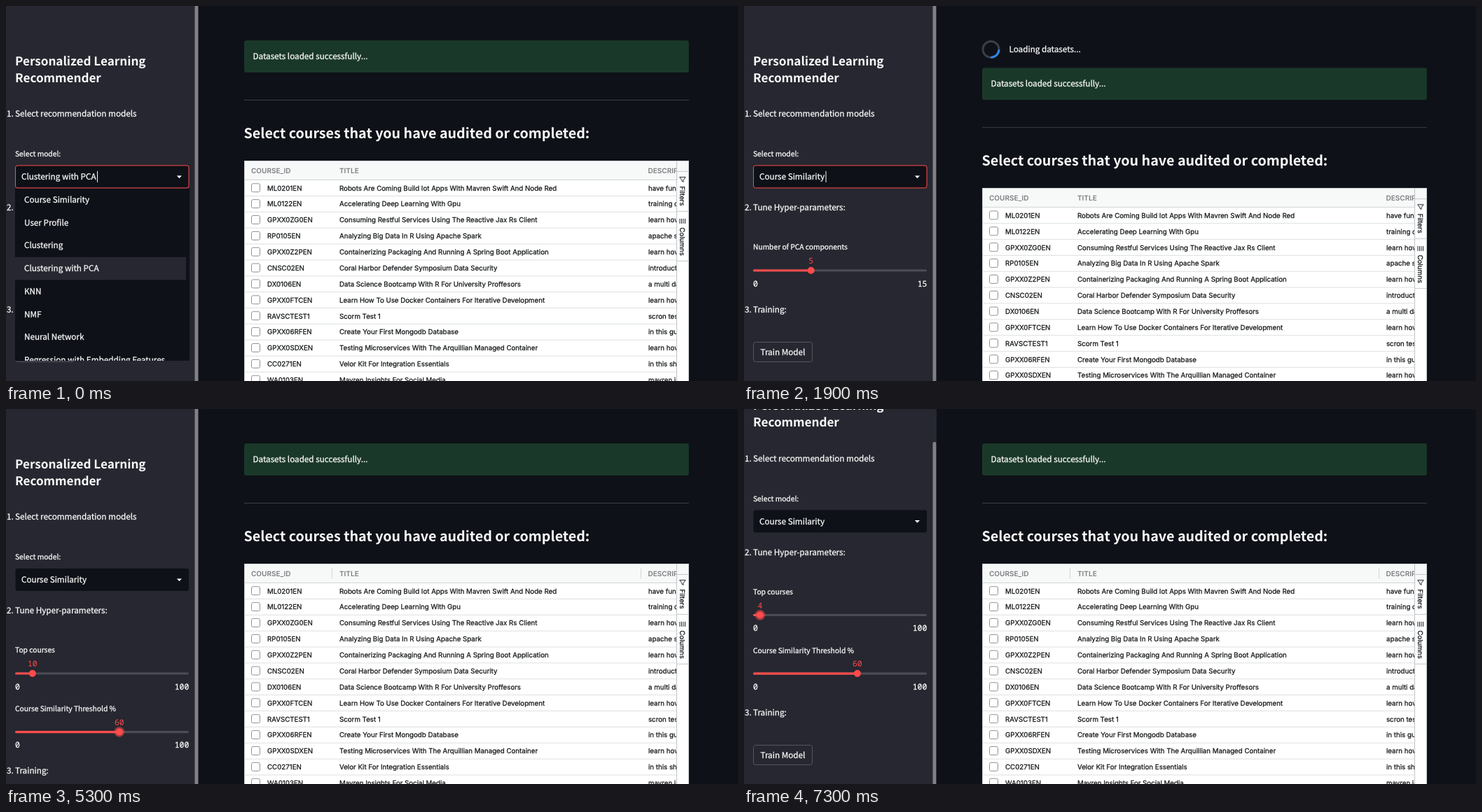
Recreate the animation shown at these times as an HTML page. Size 1045 by 536 pixels, loop 8 s.

```html
<!DOCTYPE html>
<html lang="en">
<head>
<meta charset="utf-8">
<title>Learning recommender</title>
<style>
  html, body { margin: 0; width: 100%; height: 100%; overflow: hidden; background: #0e1117; }
  svg { display: block; width: 100%; height: 100%; }
  text {
    font: 11.7px "Noto Sans CJK JP", "Noto Sans CJK SC", "Noto Sans", sans-serif;
    fill: #fafafa; stroke: #fafafa; stroke-width: .28px; text-rendering: geometricPrecision;
  }
  .title, .head { font-weight: 700; stroke: none; }
  .title { font-size: 17.1px; }
  .head { font-size: 19.7px; }
  .label { font-size: 10.25px; }
  .num { font: 11.4px "Noto Sans Mono", "Liberation Mono", monospace; }
  .red { fill: #ff4b4b; stroke: none; }
  .cell { font: 9.71px Inter, "Liberation Sans", sans-serif; fill: #121517; stroke: #121517; stroke-width: .25px; }
  .col { font: 600 10px Inter, "Liberation Sans", sans-serif; fill: #7b7d80; stroke: none; }
</style>
</head>
<body>
<svg id="stage" viewBox="0 0 1045 536" preserveAspectRatio="none"></svg>
<script>
const LOOP = 8000, SCROLL = 83.5, SPIN_SHIFT = 39.2;
const stage = document.getElementById('stage');

function el(parent, tag, attrs = {}, content) {
  const e = document.createElementNS('http://www.w3.org/2000/svg', tag);
  set(e, attrs);
  if (content !== undefined) e.textContent = content;
  parent.appendChild(e);
  return e;
}
function set(e, attrs) {
  for (const k in attrs) e.setAttribute(k, attrs[k]);
}
const group = (p, attrs) => el(p, 'g', attrs);
const text = (p, x, y, s, cls = '', attrs = {}) => el(p, 'text', { x, y, class: cls, ...attrs }, s);
const rect = (p, x, y, width, height, fill, attrs = {}) => el(p, 'rect', { x, y, width, height, fill, ...attrs });
const show = (e, on) => set(e, { visibility: on ? 'visible' : 'hidden' });
const move = (e, y) => set(e, { transform: `translate(0 ${y})` });
const clamp = v => Math.max(0, Math.min(1, v));

// Value of the last key at or before t
function step(t, keys) {
  let v = keys[0][1];
  for (const [at, val] of keys) if (t >= at) v = val;
  return v;
}

function clip(id, x, y, w, h) {
  rect(el(defs, 'clipPath', { id }), x, y, w, h, '#000');
  return { 'clip-path': `url(#${id})` };
}

const defs = el(stage, 'defs');
rect(stage, 0, 0, 1045, 536, '#0e1117');

// Main panel
const spinner = group(stage);
el(spinner, 'circle', { cx: 352.5, cy: 62, r: 11.5, fill: 'none', stroke: '#3b3e45', 'stroke-width': 3 });
const arc = el(spinner, 'path', {
  d: 'M344.4 53.9A11.5 11.5 0 0 1 360.6 53.9', fill: 'none', stroke: '#2f86e0', 'stroke-width': 3
});
text(spinner, 378.5, 66.2, 'Loading datasets...');

const main = group(stage);
rect(main, 340, 49.3, 634.8, 45.7, '#1a3829', { rx: 3 });
text(main, 352.5, 76.2, 'Datasets loaded successfully...');
rect(main, 340, 134, 634.8, 1, '#3c3e42');
text(main, 339.5, 189, 'Select courses that you have audited or completed:', 'head');

rect(main, 340, 221, 634.8, 360, '#fff');
rect(main, 340, 221, 634.8, 27.5, '#f7f8f8');
rect(main, 340, 248, 617, 1, '#cfd3d6');
const table = group(main, clip('table', 340, 221, 617, 340));
text(table, 350, 238.8, 'COURSE_ID', 'col');
text(table, 476, 238.8, 'TITLE', 'col');
text(table, 916.5, 238.8, 'DESCRIPTION', 'col');
const seps = group(table);
for (const x of [465, 906]) rect(seps, x, 228, 1, 14, '#d0d3d5');

const rows = `ML0201EN|Robots Are Coming Build Iot Apps With Mavren Swift And Node Red|have fun with
ML0122EN|Accelerating Deep Learning With Gpu|training com
GPXX0ZG0EN|Consuming Restful Services Using The Reactive Jax Rs Client|learn how to
RP0105EN|Analyzing Big Data In R Using Apache Spark|apache spark
GPXX0Z2PEN|Containerizing Packaging And Running A Spring Boot Application|learn how to
CNSC02EN|Coral Harbor Defender Symposium Data Security|introduction
DX0106EN|Data Science Bootcamp With R For University Proffesors|a multi day
GPXX0FTCEN|Learn How To Use Docker Containers For Iterative Development|learn how to
RAVSCTEST1|Scorm Test 1|scron test
GPXX06RFEN|Create Your First Mongodb Database|in this guided
GPXX0SDXEN|Testing Microservices With The Arquillian Managed Container|learn how to
CC0271EN|Velor Kit For Integration Essentials|in this short
WA0103EN|Mavren Insights For Social Media|mavren insights`.split('\n');
rows.forEach((row, i) => {
  const y = 260 + i * 22.87;
  row.split('|').forEach((s, k) => text(table, [373, 476, 917][k], y + 3.6, s, 'cell'));
  rect(table, 350.5, y - 6.2, 12, 12, '#fff', { rx: 2.2, stroke: '#8f9294' });
  rect(table, 340, y + 11, 617, 1, '#dde0e2');
});

// Table tool tabs
rect(main, 957, 221, 1, 340, '#bfc4c8');
for (const y of [236, 293, 364]) rect(main, 957, y, 17.8, 1, '#c4c9cc');
el(main, 'path', {
  d: 'M961.7 244.7h8.4l-3.1 4v2.8l-2.2 -1.4v-1.4z', fill: 'none', stroke: '#22272a'
});
for (let i = 0; i < 4; i++) rect(main, 961.5 + i * 2.5, 304, 1, 7, '#22272a');
const tab = (y, s) => text(main, 0, 0, s, 'cell', { transform: `translate(962.3 ${y}) rotate(90)` });
tab(257.5, 'Filters');
tab(316.5, 'Columns');
rect(main, 340.4, 221.4, 634, 360, 'none', { stroke: '#bdc3c7', 'stroke-width': 0.8 });

// Sidebar
rect(stage, 0, 0, 275, 536, '#262730');
const side = group(stage);
text(side, 13, 84.8, 'Personalized Learning', 'title');
text(side, 13, 108.6, 'Recommender', 'title');
function heading(p, y, n, s) {
  text(p, 1, y, n + '.');
  return text(p, 13, y, s);
}
heading(side, 158.4, 1, 'Select recommendation models');
text(side, 13, 215, 'Select model:', 'label');
const box = rect(side, 13.5, 228, 247.5, 32, '#0e1117', { rx: 3 });
const model = text(side, 22, 248.2, '');
const caret = rect(side, 0, 236, 1, 16, '#fafafa');
el(side, 'path', { d: 'M243.8 242.4h7.2l-3.6 3.8z', fill: '#fafafa' });
heading(side, 292.2, 2, 'Tune Hyper-parameters:');

function slider(y, label, max) {
  const g = group(side), at = v => 13 + 248 * v / max;
  text(g, 13, y - 29.6, label, 'label');
  rect(g, 13, y - 1.6, 248, 3.2, '#4b4c54', { rx: 1.6 });
  const fill = rect(g, 13, y - 1.6, 0, 3.2, '#ff4b4b', { rx: 1.6 });
  const halo = el(g, 'circle', { cy: y, r: 7.4, fill: '#ff4b4b', opacity: 0.5 });
  const thumb = el(g, 'circle', { cy: y, r: 5, fill: '#ff4b4b' });
  const value = text(g, 0, y - 9.8, '', 'num red', { 'text-anchor': 'middle' });
  text(g, 13, y + 22.8, 0, 'num');
  text(g, 261.3, y + 22.8, max, 'num', { 'text-anchor': 'end' });
  return (v, visible, focus) => {
    const x = at(v);
    set(fill, { width: x - 13 });
    set(halo, { cx: x });
    set(thumb, { cx: x });
    set(value, { x });
    value.textContent = v;
    show(g, visible);
    show(halo, visible && focus);
  };
}
const pca = slider(378, 'Number of PCA components', 15);
const topCourses = slider(378, 'Top courses', 100);
const threshold = slider(461.6, 'Course Similarity Threshold %', 100);

const training = group(side);
heading(training, 437.6, 3, 'Training:');
rect(training, 13.5, 480.5, 84, 28, '#262730', { rx: 3, stroke: '#55565d' });
text(training, 23.5, 498.8, 'Train Model');

// Dropdown
const menu = group(stage, clip('menu', 13, 261, 249, 246));
rect(menu, 13, 261, 249, 246, '#0e1117');
const hover = rect(menu, 13, 0, 244, 32.7, '#262730');
['Course Similarity', 'User Profile', 'Clustering', 'Clustering with PCA', 'KNN', 'NMF',
  'Neural Network', 'Regression with Embedding Features'
].forEach((s, i) => text(menu, 26, 281 + i * 32.7, s));
const menuBar = rect(menu, 256.5, 261, 4.5, 204, '#727277', { rx: 2.2 });

const sideBar = rect(stage, 269.5, 0, 4.8, 700, '#828286', { rx: 2.4 });

function render(ms) {
  const t = Math.floor(ms / 100) * 100;
  const open = t < 1300, loading = t >= 1500 && t < 2300, loaded = t >= 2300;
  const focused = t < 3500;

  show(spinner, loading);
  set(arc, { transform: `rotate(${(t - 1500) * 0.36 - 8} 352.5 62)` });
  move(main, loading ? SPIN_SHIFT : 0);
  show(seps, t >= 600 && !loading);

  model.textContent = open ? 'Clustering with PCA' : 'Course Similarity';
  set(box, { stroke: focused ? '#ff4b4b' : 'none' });
  set(caret, { x: open ? 130 : 116.5 });
  show(caret, focused && (t < 500 || t >= 1300 && t < 2800 || t >= 3300));

  show(menu, open);
  set(hover, { y: 260.8 + 32.7 * step(t, [[0, 3], [300, 2], [400, 1], [500, 0]]) });
  show(menuBar, open && t >= 400);

  pca(5, !loaded, false);
  topCourses(step(t, [[0, 10], [5800, 9], [5900, 8], [6000, 6], [6100, 5], [6200, 4]]), loaded, t >= 5400);
  threshold(
    step(t, [[0, 50], [3600, 52], [3700, 54], [3800, 56], [4000, 57], [4400, 58], [4500, 59], [4600, 60]]),
    loaded, t >= 3500 && t < 5400);
  move(training, loaded ? SCROLL : 0);

  const p = clamp((t - 6500) / 800), y = SCROLL * p * p * (3 - 2 * p);
  move(side, -y);
  set(sideBar, {
    y: y ? y * 0.563 : -3,
    opacity: open ? clamp((600 - t) / 500) : 1
  });
}

const start = performance.now();
function tick() {
  render((performance.now() - start) % LOOP);
  requestAnimationFrame(tick);
}
tick();
</script>
</body>
</html>
```
